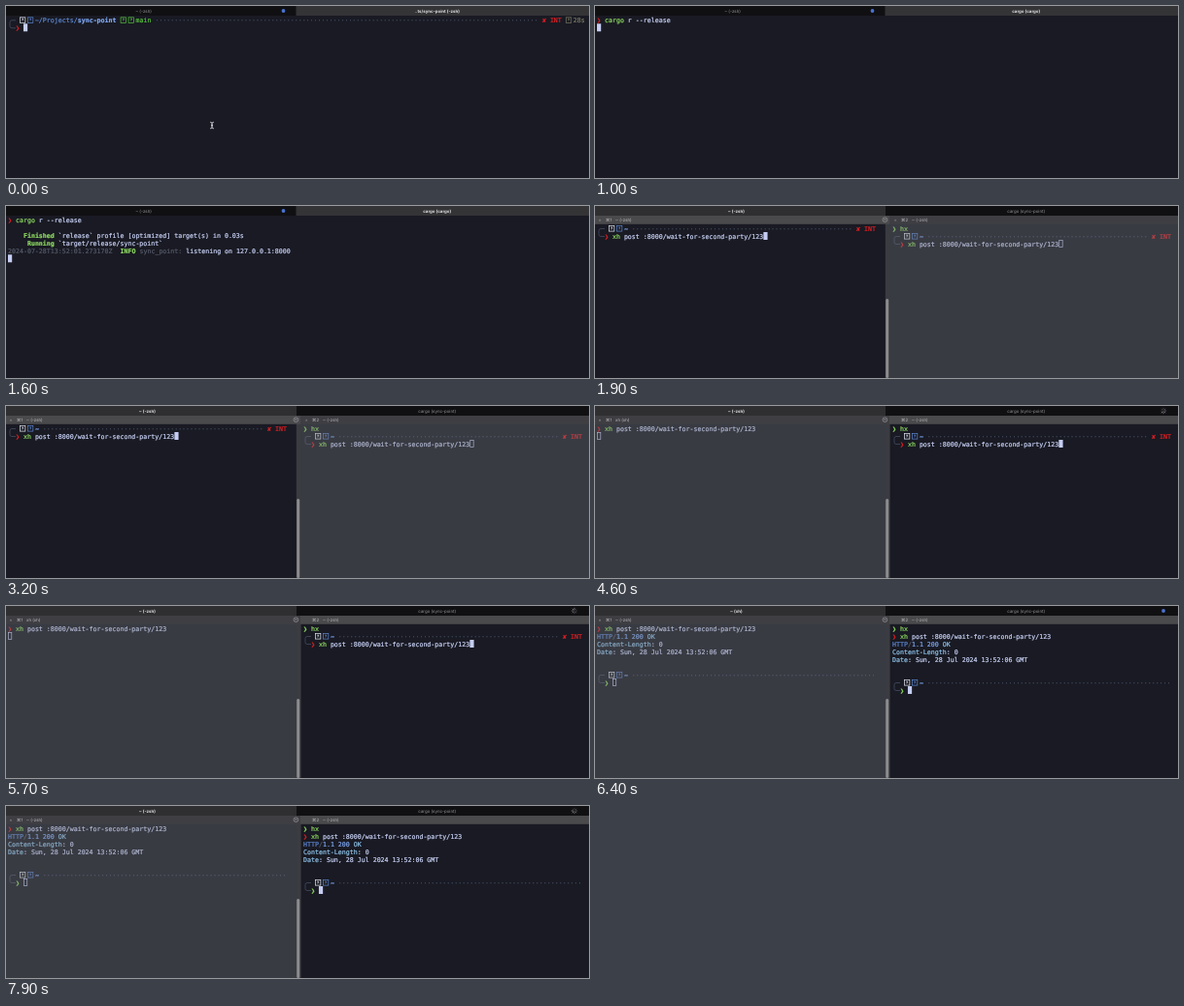
Write an HTML page that moves like this. It is 600 by 178 pixels and loops after 8000 ms.

```html
<!DOCTYPE html>
<html lang="en">
<head>
<meta charset="utf-8">
<title>Terminal session</title>
<style>
  html, body { margin: 0; width: 600px; height: 178px; overflow: hidden; background: #191a23; }
  svg { display: block; }
  text { white-space: pre; text-rendering: geometricPrecision; }
  .mono { font: 6.62px "DejaVu Sans Mono", "Liberation Mono", monospace; stroke-width: .2px; }
  .ui { font: 4.4px Inter, Roboto, sans-serif; }
  .bold { font-weight: 700; }
  .mid { text-anchor: middle; }
</style>
</head>
<body>
<svg id="stage" width="600" height="178" viewBox="0 0 600 178"></svg>
<script>
const LOOP = 8000, CELL = 3.985, ROW = 8;
const C = {
  bg: '#191a23', fg: '#c9d2f6', green: '#8fdc62', red: '#e01f24', blue: '#5c86d0',
  sky: '#7fa9f5', cyan: '#8fc3ea', dim: '#555968', line: '#454c62', white: '#e4e8f2'
};
const CMD = 'xh post :8000/wait-for-second-party/123';
const stage = document.getElementById('stage');
const timed = [];

function el(parent, name, attrs, text) {
  const node = document.createElementNS('http://www.w3.org/2000/svg', name);
  for (const key in attrs) node.setAttribute(key, attrs[key]);
  if (text !== undefined) node.textContent = text;
  parent.append(node);
  return node;
}

const rect = (g, x, y, width, height, fill, more) =>
  el(g, 'rect', { x, y, width, height, fill, ...more });

// A group that is visible from one time up to another.
function during(parent, from, to) {
  const node = el(parent, 'g', {});
  timed.push({ node, from, to });
  return node;
}

const label = (g, x, y, text, fill, cls = '') =>
  el(g, 'text', { x, y, fill, class: 'ui ' + cls }, text);

// A character grid with its top left corner at (left, top).
function terminal(g, left, top) {
  const px = col => left + col * CELL, py = row => top + row * ROW;
  const t = {
    put(row, col, text, fill = C.fg, bold = false) {
      el(g, 'text', { x: px(col), y: py(row) + 6.5, fill, stroke: fill,
        class: 'mono' + (bold ? ' bold' : '') }, text);
    },
    // Runs follow each other: [text, colour, bold]
    runs(row, col, list) {
      for (const [text, fill, bold] of list) {
        t.put(row, col, text, fill, bold);
        col += text.length;
      }
    },
    icon(row, col, color) {
      rect(g, px(col) + .5, py(row) + 1.5, 5.4, 5.6, 'none', { stroke: color, 'stroke-width': .7 });
      el(g, 'text', { x: px(col) + 3.2, y: py(row) + 6.1, fill: color, 'font-size': 4.6,
        class: 'bold mid', 'font-family': 'Inter, sans-serif' }, '?');
    },
    dots(row, from, to) {
      t.put(row, from, '·'.repeat(to - from), C.line);
    },
    cursor(row, col, solid) {
      const x = px(col), y = py(row);
      if (solid) rect(g, x, y, 4.2, 8, '#c5cdf2');
      else rect(g, x + .4, y + .4, 3.4, 7.2, 'none', { stroke: '#c5cdf2', 'stroke-width': .7 });
    },
    frame(row, arrow) {
      el(g, 'path', { d: `M${px(2)} ${py(row) + 4.5}h-4q-2 0-2 2v4q0 2 2 2h4`,
        fill: 'none', stroke: C.line, 'stroke-width': .8 });
      t.icon(row, 3, C.white);
      t.icon(row, 5, C.blue);
      t.put(row + 1, 2, '❯', arrow, true);
    },
    home(row, failed) {
      t.frame(row, failed ? C.red : C.green);
      t.put(row, 7, '~', C.sky, true);
      t.dots(row, 9, failed ? 66 : 72);
      if (failed) t.runs(row, 67, [['✘ ', C.red, true], ['INT', C.red]]);
    },
    xh(row, col) {
      t.runs(row, col, [['xh', C.green], [CMD.slice(2), C.fg]]);
    },
    sent(row) {
      t.put(row, 0, '❯', C.red, true);
      t.xh(row, 2);
    },
    reply(row) {
      t.runs(row, 0, [['HTTP', C.blue], ['/', C.dim], ['1.1 ', C.sky], ['200 ', C.sky], ['OK', C.cyan]]);
      t.runs(row + 1, 0, [['Content-Length', C.cyan], [': 0', C.fg]]);
      t.runs(row + 2, 0, [['Date', C.cyan], [': Sun, 28 Jul 2024 13:52:06 GMT', C.fg]]);
      t.home(row + 5, false);
    }
  };
  return t;
}

function tabs(g, active) {
  rect(g, 0, 0, 600, 10, '#101013');
  if (active === 0) rect(g, 0, 0, 299, 10, '#2f2f31');
  else rect(g, 298.5, 0, 301.5, 10, '#343436');
}

function tabTitle(g, x, text, active) {
  label(g, x, 6.7, text, active ? '#e2e2e4' : '#98989b', 'mid' + (active ? ' bold' : ''));
}

const blueDot = (g, x) => el(g, 'circle', { cx: x, cy: 5, r: 1.9, fill: '#4a72cf' });

// First tab view: one terminal filling the window
const single = during(stage, 0, 1900);
const full = g => terminal(g, 2, 10.3);
rect(single, 0, 0, 600, 178, C.bg);
tabs(single, 1);
tabTitle(single, 141.5, '~ (-zsh)', false);
blueDot(single, 285.5);
tabTitle(during(single, 0, 1000), 443.7, '..ts/sync-point (-zsh)', true);
tabTitle(during(single, 1000, 1900), 443.7, 'cargo (cargo)', true);

const command = [['cargo', C.green], [' r --release', C.fg]];
const prompt = during(single, 0, 1000);
const pt = full(prompt);
pt.frame(0, C.red);
pt.runs(0, 7, [['~/Projects/', C.blue], ['sync-point', C.sky, true]]);
pt.icon(0, 29, '#55c13c');
pt.icon(0, 31, '#55c13c');
pt.put(0, 33, 'main', '#55c13c');
pt.dots(0, 38, 137);
pt.runs(0, 138, [['✘ ', C.red, true], ['INT', C.red]]);
pt.icon(0, 144, '#777864');
pt.put(0, 146, '28s', '#777864');

const idle = during(prompt, 0, 100);
full(idle).cursor(1, 4, true);
el(idle, 'path', { d: 'M210 120.2q2 0 2 1v4.6q0 1-2 1M214 120.2q-2 0-2 1v4.6q0 1 2 1M211 123.5h2',
  fill: 'none', stroke: '#d6d6da', 'stroke-width': .8 });

const recalled = full(during(prompt, 100, 1000));
recalled.runs(1, 4, command);
recalled.cursor(1, 21, true);

const run = full(during(single, 1000, 1900));
run.put(0, 0, '❯', C.red, true);
run.runs(0, 2, command);
full(during(single, 1000, 1100)).cursor(1, 0, true);

const built = full(during(single, 1100, 1900));
built.runs(2, 4, [['Finished', C.green, true], [' `release` profile [optimized] target(s) in 0.03s', C.fg]]);
built.runs(3, 5, [['Running', C.green, true], [' `target/release/sync-point`', C.fg]]);
full(during(single, 1100, 1200)).cursor(4, 0, true);

const log = full(during(single, 1200, 1900));
log.runs(4, 0, [['2024-07-28T13:52:01.273170Z  ', C.dim], ['INFO ', C.green, true],
  ['sync_point: ', C.dim], ['listening on 127.0.0.1:8000', C.fg]]);
log.cursor(5, 0, true);

// Second tab view: two panes side by side
const SEND = 4400, SWAP = 4600, REPLY = 6300;
const split = during(stage, 1900, LOOP);
const leftPane = (from, to) => terminal(during(split, from, to), 2, 19);
const rightPane = (from, to) => terminal(during(split, from, to), 306, 19);
rect(split, 0, 0, 600, 178, C.bg);

const before = leftPane(1900, SEND);
before.home(0, true);
before.xh(1, 4);
before.cursor(1, 43, true);

leftPane(SEND, LOOP).sent(0);
leftPane(SEND, SWAP).cursor(1, 0, true);
leftPane(SWAP, REPLY).cursor(1, 0, false);
const leftDone = leftPane(REPLY, LOOP);
leftDone.reply(1);
leftDone.cursor(7, 4, false);

rightPane(1900, LOOP).runs(0, 0, [['❯ ', C.green, true], ['hx', C.green]]);
const waiting = rightPane(1900, REPLY);
waiting.home(1, true);
waiting.xh(2, 4);
rightPane(1900, SWAP).cursor(2, 43, false);
rightPane(SWAP, REPLY).cursor(2, 43, true);
const rightDone = rightPane(REPLY, LOOP);
rightDone.sent(1);
rightDone.reply(2);
rightDone.cursor(8, 4, true);

// The pane without focus is greyed
const veil = { opacity: .35 };
rect(during(split, SWAP, LOOP), 0, 18, 299, 160, '#77787e', veil);
rect(during(split, 1900, SWAP), 303, 18, 297, 160, '#77787e', veil);

rect(split, 298.8, 18, 4.8, 160, '#3b3c42');
rect(split, 299.2, 96, 3, 82, '#8c8c8f', { rx: 1.5 });

const paneBar = (g, x, width, focus) =>
  rect(g, x, 10, width, 8.8, focus ? '#4a4a4d' : '#3f3f43');
const barLeft = during(split, 1900, SWAP), barRight = during(split, SWAP, LOOP);
paneBar(barLeft, 0, 303, true);
paneBar(barLeft, 303, 297, false);
paneBar(barRight, 0, 303, false);
paneBar(barRight, 303, 297, true);
label(barLeft, 307.8, 16, '×', '#919195');

label(split, 3.6, 16, '×', '#a0a0a4');
label(split, 11, 15.8, '⌘1', '#b8b8bb');
label(split, 315, 15.8, '⌘2', '#b8b8bb');
label(split, 326, 15.8, '~ (-zsh)', '#b8b8bb');
for (const [from, to, text] of [[1900, SEND, '~ (-zsh)'], [SEND, REPLY, 'xh (xh)'], [REPLY, LOOP, '~ (-zsh)']])
  label(during(split, from, to), 21, 15.8, text, '#c0c0c3');
el(split, 'circle', { cx: 298.4, cy: 14.2, r: 2.4, fill: 'none', stroke: '#a4a4a8', 'stroke-width': .6 });
el(split, 'path', { d: 'M297.1 13.7h2.6M297.6 14.8h1.6', stroke: '#a4a4a8', 'stroke-width': .5 });

tabs(split, 0);
tabTitle(split, 443.7, 'cargo (sync-point)', false);
for (const [from, to, text] of [[1900, SEND, '~ (-zsh)'], [SEND, SWAP, 'xh (xh)'],
  [SWAP, REPLY, '~ (-zsh)'], [REPLY, 6500, '~ (xh)'], [6500, LOOP, '~ (-zsh)']])
  tabTitle(during(split, from, to), 145.3, text, true);

// Activity marks on the server tab
blueDot(during(split, 6400, 6500), 585);
const spinners = [[SEND, 6400], [6500, LOOP]].map(([from, to]) => {
  const g = el(during(split, from, to), 'g', {});
  for (let i = 0; i < 8; i++)
    el(g, 'path', { d: 'M0-1.3V-2.8', stroke: '#b4b4b8', 'stroke-width': .7,
      'stroke-linecap': 'round', opacity: .25 + i * .09, transform: `rotate(${i * 45})` });
  return g;
});

const start = performance.now();
function draw(now) {
  const t = Math.max(0, now - start) % LOOP;
  for (const { node, from, to } of timed)
    node.style.display = t >= from && t < to ? '' : 'none';
  const angle = Math.floor(t / 100) * 45 % 360;
  for (const g of spinners) g.setAttribute('transform', `translate(585 5) rotate(${angle})`);
  requestAnimationFrame(draw);
}
draw(start);
</script>
</body>
</html>
```
